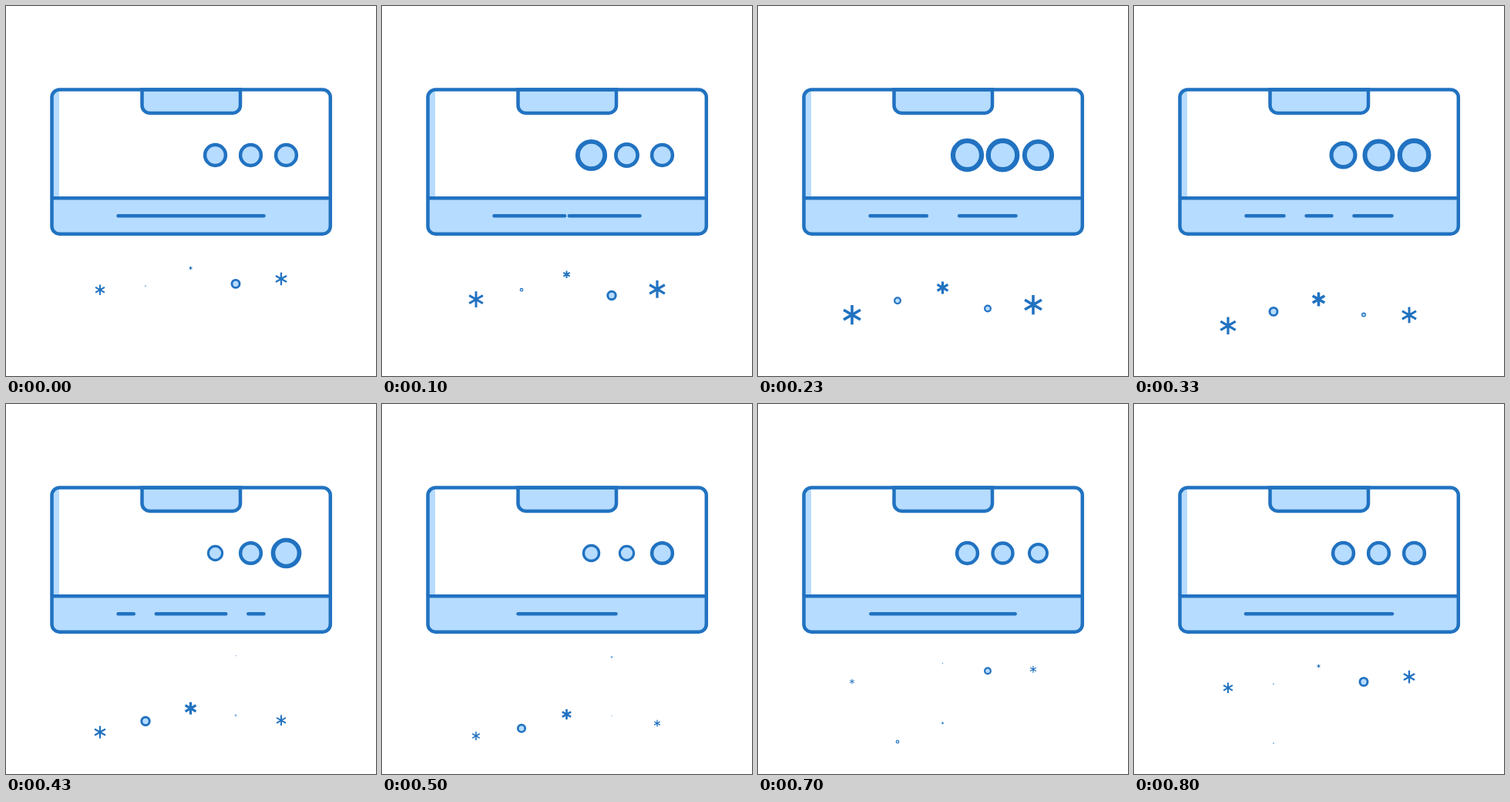
Animation, 480 px wide and 480 px high, one loop 0.83 s. Source, as an HTML page with a canvas:

```html
<!DOCTYPE html>
<html lang="en">
<head>
<meta charset="utf-8">
<title>Air conditioner</title>
<style>
  html, body { margin: 0; width: 100%; height: 100%; overflow: hidden; background: #fff; }
  canvas { display: block; width: 480px; height: 480px; }
</style>
</head>
<body>
<canvas id="stage" width="480" height="480"></canvas>
<script>
const ctx = document.getElementById('stage').getContext('2d');
const LINE = '#2172c1', FILL = '#b6dcff', STROKE = 4.5;
const LOOP = 830, STEP = 100 / 3, CYCLE = 24, LIFE = 28;

const LIGHTS = [271.5, 317.5, 363.5];
const SNOW = [
  { x: 122, y: 356.4, age: 7, flake: 12.6 },
  { x: 181, y: 362.4, age: 2 },
  { x: 239.5, y: 336.4, age: 4, flake: 9 },
  { x: 298, y: 326.4, age: 12 },
  { x: 357, y: 338.4, age: 8, flake: 12.8 }
];

// Eases 0 to 1: a larger a starts more gently, a larger b ends more gently
function ease(t, a, b) {
  t = Math.min(1, Math.max(0, t));
  return 1 - (1 - t ** a) ** b;
}

// Swell, shrink below normal size, recover
function pulse(k) {
  return 1 + .4 * ease(k / 4.7, 2, 3)
    - .72 * ease((k - 5) / 8, 3, 1.5)
    + .32 * ease((k - 13) / 7, 1.5, 1.5);
}

function shape(build, width, fill) {
  ctx.beginPath();
  build();
  if (fill) { ctx.fillStyle = fill; ctx.fill(); }
  if (width) { ctx.lineWidth = width; ctx.stroke(); }
}

function line(x1, y1, x2, y2) {
  ctx.moveTo(x1, y1);
  ctx.lineTo(x2, y2);
}

function disc(x, y, r, width) {
  shape(() => ctx.arc(x, y, r, 0, 7), width, FILL);
}

function drawBody() {
  const box = () => ctx.roundRect(59.5, 108.5, 361.3, 187.2, 10);
  ctx.save();
  shape(box);
  ctx.clip();
  ctx.fillStyle = FILL;
  ctx.fillRect(58, 106, 11, 143);
  ctx.fillRect(58, 249, 365, 50);
  ctx.restore();
  shape(() => ctx.roundRect(176.5, 108.5, 127.5, 30.4, [0, 0, 10, 10]), STROKE, FILL);
  shape(() => line(60, 249.2, 421, 249.2), STROKE);
  shape(box, STROKE);
}

// Two gaps open in the middle and travel outwards
function drawVent(k) {
  const gap = 124 * ease(k / CYCLE, 2.4, 3.5), inner = gap - 29;
  ctx.lineCap = 'round';
  shape(() => {
    if (gap < 90) {
      line(145.5, 272.2, 240 - gap, 272.2);
      line(240 + gap, 272.2, 334.5, 272.2);
    }
    if (inner > 0) line(240 - inner, 272.2, 240 + inner, 272.2);
  }, STROKE);
  ctx.lineCap = 'butt';
}

function drawSnow({ x, y, age, flake }, k) {
  for (const t of [k + age, k + age - CYCLE]) {
    if (t <= 0 || t >= LIFE) continue;
    const u = 1 - Math.abs(2 * t / LIFE - 1);
    const size = .08 + .92 * u * u * (3 - 2 * u);
    const cy = y + 78 * ease(t / LIFE, 2.2, 3.4);
    if (!flake) {
      disc(x, cy, 5.3 * size, 3 * size);
      continue;
    }
    shape(() => {
      for (const angle of [30, 90, 150]) {
        const a = angle * Math.PI / 180;
        const dx = flake * size * Math.cos(a), dy = flake * size * Math.sin(a);
        line(x - dx, cy - dy, x + dx, cy + dy);
      }
    }, 3.6 * size);
  }
}

function draw(now) {
  const k = Math.min(CYCLE, Math.floor((now % LOOP + 3.35) / STEP));
  ctx.fillStyle = '#fff';
  ctx.fillRect(0, 0, 480, 480);
  ctx.strokeStyle = LINE;
  drawBody();
  drawVent(k);
  LIGHTS.forEach((x, i) => {
    const scale = pulse(k - 2 * i);
    disc(x, 193.5, 13.4 * scale, STROKE * scale);
  });
  SNOW.forEach(item => drawSnow(item, k));
}

function tick() {
  draw(performance.now());
  requestAnimationFrame(tick);
}
tick();
</script>
</body>
</html>
```
